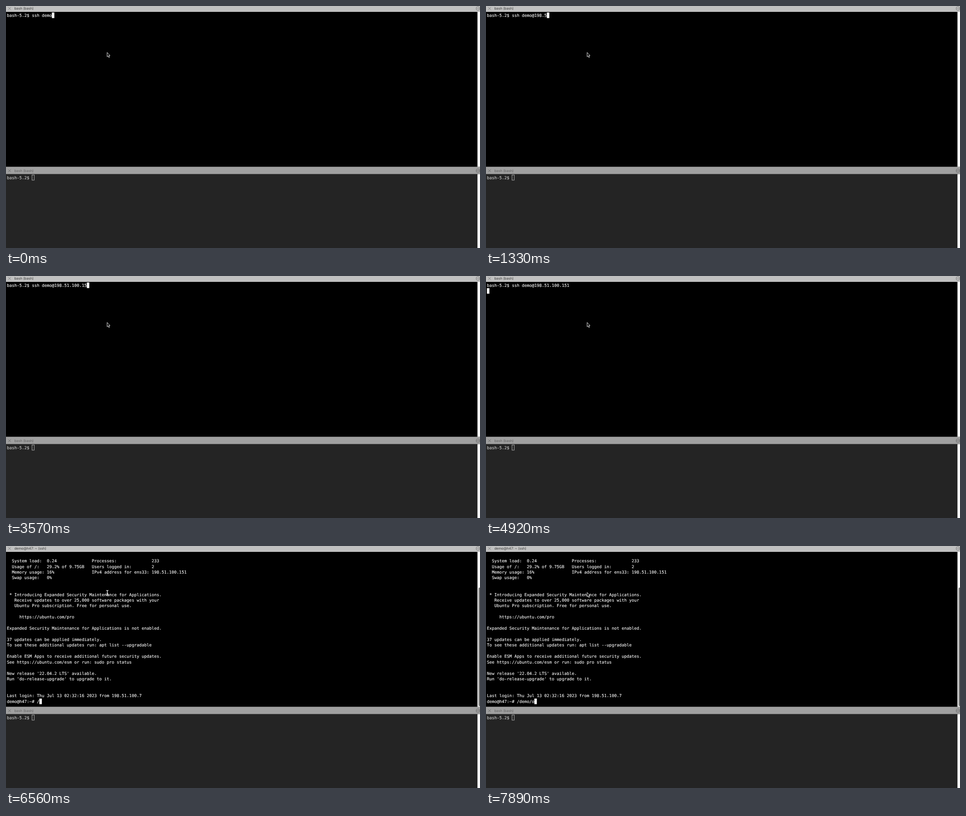
An HTML page that plays this animation: 1047 px wide and 535 px high, repeating every 8 s.

```html
<!DOCTYPE html>
<html lang="en">
<head>
<meta charset="utf-8">
<title>Terminal</title>
<style>
  html, body { margin: 0; width: 100%; height: 100%; overflow: hidden; background: #000; }
  svg { display: block; }
  text { white-space: pre; text-rendering: geometricPrecision; }
  .mono { font: 9.16px "DejaVu Sans Mono", monospace; fill: #fff; stroke: #fff; stroke-width: .12; }
  .idle { fill: #cfcfcf; stroke: #cfcfcf; }
  .title { font: 7.6px Inter, sans-serif; }
  .line { fill: none; stroke-width: .8; }
</style>
</head>
<body>
<svg width="1047" height="535" viewBox="0 0 1047 535">
  <defs>
    <g id="icons" class="line">
      <path d="M4.8 2.5l6 6m0-6l-6 6"/>
      <circle cx="1042.3" cy="5.5" r="4"/>
      <path d="M1039.8 5.5h5" stroke-width="1.2" stroke-dasharray="1.2 .7"/>
    </g>
  </defs>

  <rect width="1047" height="535"/>
  <rect width="1047" height="13" fill="#c0c0c0"/>
  <use href="#icons" stroke="#6c6c6c"/>
  <text id="title" class="title" x="18.4" y="8.4" fill="#3e3e3e"></text>

  <rect y="355.4" width="1047" height="16.6" fill="#a0a0a0"/>
  <use href="#icons" y="358.6" stroke="#606060"/>
  <text class="title" x="18.4" y="367" fill="#606060">bash (bash)</text>
  <rect y="371.5" width="1042" height="163.5" fill="#242424"/>
  <text class="mono idle" x="2" y="382.6">bash-5.2$</text>
  <rect class="line" x="57.5" y="373.5" width="4.8" height="11.5" stroke="#d0d0d0"/>

  <path d="M1041.4 13h5.6v342.4h-5.6zM1041.4 372h5.6v163h-5.6z" fill="#fafafa"/>
  <rect id="thumb" x="1043.8" y="92" width="5" height="262" rx="2" fill="#7c7c7c"/>

  <g id="rows" class="mono"></g>
  <rect id="cursor" width="5.5" height="12.3" fill="#fff"/>
  <path id="arrow" d="M223.3 102.7v9.6l2.2-2 1.6 3.6 1.6-.7-1.6-3.5h2.8z" stroke="#fff" stroke-width=".9"/>
  <path id="beam" d="M221.4 98.2q2.4 0 2.4 1.8q0-1.8 2.4-1.8M223.8 100v7M222.2 104.6h3.2M221.4 108.6q2.4 0 2.4-1.8q0 1.8 2.4 1.8" fill="none" stroke="#fff" stroke-width="1.2"/>
</svg>
<script>
const LOOP = 8000, CELL = 5.515, LINE = 12.42;
const ENTER = 4620, LOGIN = 5510, PROMPT = 5660;
const HOST = '198.51.100.151';

const command = {
  prompt: 'bash-5.2$ ssh demo',
  keys: '@' + HOST,
  times: [150, 450, 740, 890, 1040, 1330, 1480, 1630, 2070, 2370, 2520, 2970, 3120, 3570, 3720]
};
const path = {
  prompt: 'demo@h47:~# ',
  keys: '/demo/o',
  times: [6560, 6710, 7000, 7150, 7300, 7600, 7890]
};
const banner = `
  System load:  0.24              Processes:              233
  Usage of /:   29.2% of 9.75GB   Users logged in:        2
  Memory usage: 16%               IPv4 address for ens33: ${HOST}
  Swap usage:   0%


 * Introducing Expanded Security Maintenance for Applications.
   Receive updates to over 25,000 software packages with your
   Ubuntu Pro subscription. Free for personal use.

     https://ubuntu.com/pro

Expanded Security Maintenance for Applications is not enabled.

37 updates can be applied immediately.
To see these additional updates run: apt list --upgradable

Enable ESM Apps to receive additional future security updates.
See https://ubuntu.com/esm or run: sudo pro status

New release '22.04.2 LTS' available.
Run 'do-release-upgrade' to upgrade to it.


Last login: Thu Jul 13 02:32:16 2023 from 198.51.100.7`.split('\n');

const $ = id => document.getElementById(id);
const show = (id, on) => $(id).setAttribute('visibility', on ? 'visible' : 'hidden');
const within = (t, from, to) => t >= from && t < to;
const typed = (entry, t) =>
  entry.prompt + entry.keys.slice(0, entry.times.filter(time => time <= t).length);

const rows = Array.from({ length: banner.length + 1 }, (_, i) => {
  const row = document.createElementNS('http://www.w3.org/2000/svg', 'text');
  row.setAttribute('x', 2);
  row.setAttribute('y', 23.7 + i * LINE);
  return $('rows').appendChild(row);
});

function screenAt(t) {
  if (t >= LOGIN) return [...banner, t < PROMPT ? '' : typed(path, t)];
  return t < ENTER ? [typed(command, t)] : [typed(command, t), ''];
}

function draw(t) {
  const lines = screenAt(t), last = lines.length - 1;
  rows.forEach((row, i) => row.textContent = lines[i] || '');
  $('cursor').setAttribute('x', 2 + lines[last].length * CELL);
  $('cursor').setAttribute('y', 14.4 + last * LINE);
  $('title').textContent =
    t < LOGIN ? 'bash (bash)' : `demo@h47: ~ (${t < PROMPT ? 'bash' : 'ssh'})`;
  show('thumb', t >= LOGIN);

  const beam = within(t, 4770, 4920) || within(t, LOGIN, 6860) || within(t, 7000, 7300);
  show('beam', beam);
  show('arrow', !beam);
}

function tick() {
  draw(performance.now() % LOOP);
  requestAnimationFrame(tick);
}
tick();
</script>
</body>
</html>
```
